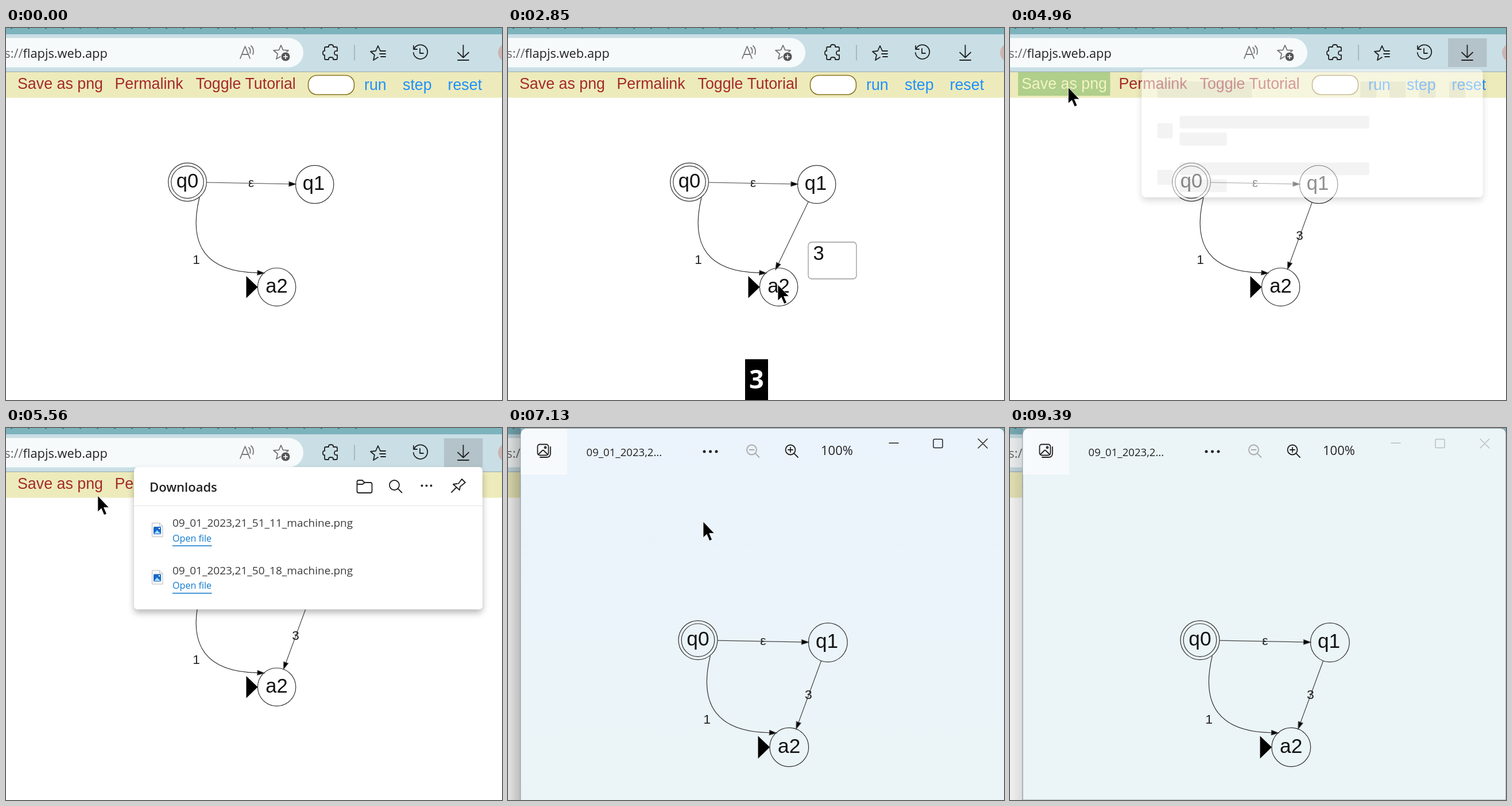
Animation of 864x648 px, one loop 9.46 s. Source, as an HTML page:

```html
<!DOCTYPE html>
<html lang="en">
<head>
<meta charset="utf-8">
<title>State machine editor</title>
<style>
html, body { margin: 0; width: 100%; height: 100%; overflow: hidden; background: #fff; }
svg { display: block; width: 864px; height: 648px; }
.ui { font-family: "Open Sans", "Noto Sans", sans-serif; }
.page { font-family: "Liberation Sans", Arial, sans-serif; }
.line { fill: none; stroke: #222; stroke-width: 1.8; stroke-linecap: round; stroke-linejoin: round; }
.node { fill: none; stroke: #333; stroke-width: 1.2; }
.name { font-size: 34.5px; text-anchor: middle; fill: #111; }
.label { font-size: 22.5px; text-anchor: middle; fill: #222; }
.edge { fill: #000; stroke: #444; stroke-width: 1.2; }
.menu { font-size: 26.8px; fill: #a52a2a; }
.act { font-size: 26.8px; fill: #1e90ff; }
.file { font-size: 19px; fill: #3b3b3b; }
.open { font-size: 16.1px; fill: #0f78cc; }
.key { font-size: 45px; font-weight: 700; fill: #fff; }
.bone rect { fill: #eaeaea; }
</style>
</head>
<body>
<svg viewBox="0 0 864 648">
  <defs>
    <linearGradient id="sky" x1="0" y1="0" x2="0" y2="1">
      <stop offset="0" stop-color="#ebf3fc"/><stop offset=".45" stop-color="#ebf4fa"/><stop offset="1" stop-color="#ebf4f6"/>
    </linearGradient>
    <linearGradient id="fade">
      <stop offset="0" stop-color="#000" stop-opacity=".1"/><stop offset="1" stop-color="#000"/>
    </linearGradient>
    <filter id="drop" x="-10%" y="-10%" width="120%" height="130%">
      <feDropShadow dx="0" dy="6" stdDeviation="6" flood-opacity=".28"/>
    </filter>
    <g id="graph" class="page">
      <path class="edge" id="toQ1"/>
      <path class="node" d="M337 295Q306 424 438 426.4"/>
      <path class="edge" id="toA2"/>
      <circle class="node" cx="316" cy="268.5" r="33.3"/>
      <circle class="node" cx="316" cy="268.5" r="28.2"/>
      <circle class="node" cx="537.7" cy="272.5" r="33.2"/>
      <circle class="node" cx="471.6" cy="451.2" r="33.2"/>
      <path d="M418.5 432V470.5L438.5 451.2Z"/>
      <text class="name" x="316" y="278">q0</text>
      <text class="name" x="536" y="282">q1</text>
      <text class="name" x="471.5" y="461">a2</text>
      <text class="label" x="427" y="276.5">ε</text>
      <text class="label" x="331.5" y="411">1</text>
    </g>
    <path id="star" d="M0-13 3.6-4.6 13-4 5.8 2 8 11 0 6.2-8 11-5.8 2-13-4-3.6-4.6Z"/>
    <path id="folder" d="M-13-8q0-3 3-3h6l4 4h10q3 0 3 3V8q0 3-3 3H-10q-3 0-3-3Z"/>
    <g id="lens"><circle r="8.5" cx="-2" cy="-2"/><path d="M4.2 4.2 11 11"/></g>
    <g id="doc">
      <path d="M254.500 165.500h13l5.500 5.500v18.500h-18.500Z" fill="#fafafa" stroke="#bbb"/>
      <path d="M267.500 165.500v5.500h5.500" fill="none" stroke="#bbb"/>
      <rect x="257" y="172" width="13" height="13" rx="1.500" fill="#1769c9"/>
      <path d="M258 184l5-6 6.500 6Z" fill="#a9dcff"/><circle cx="267" cy="175" r="1.300" fill="#fff"/>
    </g>
  </defs>

  <rect width="864" height="648" fill="#fff"/>
  <g class="ui">
    <rect width="864" height="77" fill="#c9dfe5"/>
    <rect width="864" height="11" fill="#7db3bd"/>
    <path d="M8 .5H620" stroke="#38616a" stroke-width="1.500" stroke-dasharray="3 27"/>
    <path d="M0 76.300H864" stroke="#a9babd" stroke-width="1.400"/>
    <rect x="-60" y="17.500" width="578" height="51" rx="25.500" fill="#f7fafb"/>
    <text x="29.500" y="51.500" font-size="21.800" fill="#666" text-anchor="end">s://</text>
    <text x="29.500" y="51.500" font-size="21.800" fill="#222">flapjs.web.app</text>
    <rect id="pressed" x="763" y="18" width="67.500" height="50" fill="#b3c3c9"/>
    <g class="line" style="stroke:#777">
      <path d="M408 53 416.500 32 425 53M411 46h11M423 34q4 4 2 10M427 31q6 6 3 15"/>
      <use href="#star" x="479" y="43"/>
    </g>
    <circle cx="487" cy="50" r="8" fill="#555" stroke="#f7fafb"/>
    <path d="M483 50h8M487 46v8" stroke="#fff" stroke-width="1.600"/>
    <g class="line">
      <path d="M557 33h5q-1-4 4-4t4 4h5q2 0 2 2v5q-5-1-5 3.500t5 3.500v6q0 2-2 2h-5q1-4-4-4t-4 4h-5q-2 0-2-2v-6q-3 1-3-3.500t3-3.500v-5q0-2 2-2Z"/>
      <path d="M607 30V56" style="stroke:#98a9ae;stroke-width:1.400"/>
      <path d="M660 40h-8l-4-9-4 9-9 1 7 6-2 9 8-5M652 40h9M651 45h10M653 50h8"/>
      <path d="M711 36A12.300 12.300 0 1 1 709.700 43M710 31v6h6M721 36v8h6"/>
      <path d="M796.500 30V51M787 42.500l9.500 9 9.500-9M787 56h19"/>
    </g>
    <circle cx="873" cy="43" r="16" fill="#cbb6b4"/>
  </g>

  <g class="page">
    <rect y="77" width="864" height="44.500" fill="#edebbb"/>
    <rect id="hover" x="14" y="77" width="160.500" height="41" fill="#afcf8a"/>
    <text id="save" class="menu" x="20" y="106">Save as png</text>
    <text class="menu" x="189.500" y="106">Permalink</text>
    <text class="menu" x="330.500" y="106">Toggle Tutorial</text>
    <rect x="526.500" y="82.500" width="80" height="33.500" rx="15" fill="#fff" stroke="#8a7420" stroke-width="1.600"/>
    <text class="act" x="624" y="108">run</text>
    <text class="act" x="691" y="108">step</text>
    <text class="act" x="769.500" y="108">reset</text>
    <use href="#graph"/>
    <path id="drag" class="edge"/>
    <text id="three" class="label" x="504.500" y="368.500">3</text>
    <g id="prompt">
      <rect x="523" y="373" width="84" height="64" rx="6" fill="#fff" stroke="#999" stroke-width="1.300"/>
      <text id="typed" class="name" x="541" y="404">3</text>
    </g>
  </g>

  <g id="panel" class="ui">
    <rect id="sheet" x="223" y="68" width="607" height="248" rx="7" fill="#fff" filter="url(#drop)"/>
    <g id="bones" class="bone"></g>
    <g id="list">
      <text x="250" y="110.500" font-size="22" font-weight="600" fill="#222">Downloads</text>
      <g class="line">
        <use href="#folder" x="624.500" y="102"/><path d="M612 98h9l4-3"/>
        <use href="#lens" x="678.500" y="101.500"/>
        <path d="M788 97 794 89 800 95 791 102 790 108 779 98 786 97M784 104 776 112"/>
      </g>
      <path d="M724.500 100.500h.01M732.500 100.500h.01M740.500 100.500h.01" stroke="#222" stroke-width="4" stroke-linecap="round"/>
      <path d="M223 135.500H830" stroke="#e4e4e4"/>
      <g id="row">
        <rect id="rowBox" x="231" y="138.500" width="591.500" height="79" fill="#f1f1f1" stroke-width="3"/>
        <g class="line">
          <path d="M669 186V168q0-3 3-3h5l4 4h8q3 0 3 3v3M669 186l4-9q1-2 3-2h18l-3 10q-1 3-3 3H671q-2 0-2-2Z"/>
          <path d="M751 167.500h24M758 167q0-5 5-5t5 5M754 168l2 19q0 2 2 2h10q2 0 2-2l2-19M760 174v9M766 174v9"/>
        </g>
      </g>
      <use href="#doc"/><use href="#doc" y="82.500"/>
      <text class="file" x="290" y="172">09_01_2023,21_51_11_machine.png</text>
      <text class="open" x="290" y="197.500">Open file</text>
      <text class="file" x="290" y="254.500">09_01_2023,21_50_18_machine.png</text>
      <text class="open" x="290" y="280">Open file</text>
      <path d="M290 205.300H358.500M290 287.800H358.500" stroke="#0f78cc" stroke-width="1.500"/>
    </g>
  </g>

  <g id="viewer" class="ui">
    <rect id="shade" x="-12" width="34" height="648" fill="url(#fade)"/>
    <path d="M22 648V12Q22 .5 33.500 .5H853Q864 .5 864 10V648Z" fill="#ebf4f7" stroke="#84969b" stroke-width="1.200"/>
    <path id="active" d="M22.500 648V12Q22.500 1 33.500 1H853Q864 1 864 10V648Z" fill="url(#sky)"/>
    <path d="M22.500 81V12Q22.500 1 33.500 1H103V81Z" fill="#f7fafc"/>
    <g class="line">
      <rect x="51.500" y="28.500" width="19" height="19" rx="4"/>
      <path d="M53 46l6.500-6.500q1.500-1.500 3 0L69 46M74 33v11q0 7-7 7H56"/>
      <circle cx="65" cy="34" r="1.500"/>
      <g style="stroke:#aaa"><use href="#lens" x="426.500" y="40"/><path d="M420.500 38h8"/></g>
      <use href="#lens" x="494" y="40"/><path d="M488 38h8M492 34v8"/>
      <path id="controls" style="stroke-width:1.500" d="M664 26.300h16M743 19.500h12q2 0 2 2v11q0 2-2 2h-12q-2 0-2-2v-11q0-2 2-2ZM819 19l16 16M835 19l-16 16"/>
    </g>
    <path d="M342 41h.01M352.500 41h.01M363 41h.01" stroke="#222" stroke-width="5" stroke-linecap="round"/>
    <text x="136.500" y="48.500" font-size="18.600" fill="#222">09_01_2023,2...</text>
    <text x="545" y="47" font-size="22" fill="#222">100%</text>
    <g id="photo" class="page" transform="translate(8.300 95.400) scale(1.021)">
      <use href="#graph"/>
      <path id="shot" class="edge"/>
      <text class="label" x="504.500" y="368.500">3</text>
    </g>
  </g>

  <g id="keys" class="ui">
    <rect id="keyBox" y="577" height="71"/>
    <text id="key1" class="key" y="628">3</text>
    <text id="key2" class="key" x="399" y="628">Enter</text>
  </g>
  <circle id="press" r="20" fill="#ff3c3c" fill-opacity=".62"/>
  <path id="arrow" d="M0 0V28L6.200 22.300 11 33.500 15.500 31.500 10.700 20.500H19.500Z" stroke="#fff" stroke-width=".8"/>
  <path id="hand" d="M0-.5q2.500-2 4.500 1V12l9 2q5 1 5 6l-2 8v6H1l-1-4-8-10q-1-3 2-3.500L0 20Z" fill="#fff" stroke="#111" stroke-width="1.500" stroke-linejoin="round"/>
</svg>
<script>
const LOOP = 9460;
const $ = id => document.getElementById(id);
const set = (id, attrs) => { for (const k in attrs) $(id).setAttribute(k, attrs[k]); };
const show = (id, on) => { $(id).style.display = on ? "" : "none"; };
const clamp = v => Math.max(0, Math.min(1, v));
const ramp = (t, a, b) => clamp((t - a) / (b - a));
const smooth = u => u * u * (3 - 2 * u);
const mix = (a, b, u) => a + (b - a) * u;

// Pointer stops: time, x, y. It eases between neighbours.
const stops = [
  [70, 509, 474], [890, 560, 267], [960, 560, 267], [1020, 552, 287],
  [1410, 480, 433], [1720, 470, 447], [3660, 470, 447], [4490, 101.5, 103.5],
  [5300, 101.5, 103.5], [6110, 340, 163], [7390, 340, 163], [8300, 629, 393],
  [8360, 629, 393], [8680, 735, 149], [8990, 792, 655]
];

function pointer(t) {
  let i = 0;
  while (i < stops.length - 2 && t >= stops[i + 1][0]) i++;
  const [a, b] = [stops[i], stops[i + 1]];
  const u = smooth(ramp(t, a[0], b[0]));
  return [mix(a[1], b[1], u), mix(a[2], b[2], u)];
}

function arrowPath(x1, y1, x2, y2) {
  const len = Math.hypot(x2 - x1, y2 - y1) || 1;
  const c = (x2 - x1) / len, s = (y2 - y1) / len;
  const bx = x2 - 12 * c, by = y2 - 12 * s;
  return `M${x1} ${y1}L${bx} ${by}M${x2} ${y2}L${bx - 4 * s} ${by + 4 * c}L${bx + 4 * s} ${by - 4 * c}Z`;
}

const q1 = [537.7, 272.5], radius = 33.2;
function fromQ1(x, y) {
  const dx = x - q1[0], dy = y - q1[1], len = Math.hypot(dx, dy);
  if (len < radius + 12) return "";
  return arrowPath(q1[0] + dx / len * radius, q1[1] + dy / len * radius, x, y);
}

const finalEdge = fromQ1(483.5, 420);
set("toQ1", { d: arrowPath(349.5, 269, 505, 272) });
set("toA2", { d: arrowPath(437, 426.2, 450, 427) });
set("shot", { d: finalEdge });

const bone = (x, y, w, h) => `<rect x="${x}" y="${y}" width="${w}" height="${h}" rx="3"/>`;
$("bones").innerHTML = bone(251, 90, 168, 29)
  + [612, 664, 717, 770].map(x => bone(x, 90, 29, 29)).join("")
  + [0, 83].map(d => bone(251, 164 + d, 27, 27) + bone(290.5, 151 + d, 337.5, 22.5) + bone(290.5, 181 + d, 84, 23)).join("");

function draw(t) {
  const [x, y] = pointer(t);
  const inPanel = t > 5160 && t < 6850 && x > 232;
  const visible = t >= 70 && t < 8990;
  const at = `translate(${x} ${y})`;

  show("arrow", visible && !inPanel);
  show("hand", inPanel);
  set("arrow", { transform: at });
  set("hand", { transform: `translate(${x + 1} ${y})` });
  show("press", (t >= 1020 && t < 1480) || (t >= 4690 && t < 4820) || (t >= 6390 && t < 6510));
  set("press", { transform: at });

  // The new edge keeps the grab offset until its label is entered.
  const held = pointer(Math.min(t, 1410));
  show("drag", t >= 1020);
  set("drag", { d: t < 3250 ? fromQ1(held[0] - 14, held[1] - 12) : finalEdge });
  show("three", t >= 3250);
  show("prompt", t >= 1780 && t < 3250);
  show("typed", t >= 2850);

  const entered = t >= 3120;
  show("keys", t >= 2850 && t < 4000);
  set("keyBox", { x: entered ? 336 : 413, width: entered ? 195.5 : 40 });
  set("key1", { x: entered ? 342.5 : 420 });
  show("key2", entered);

  const overSave = x > 14 && x < 174 && y > 77 && y < 118;
  show("hover", overSave);
  $("save").style.fill = overSave ? "#f4f3c4" : "";

  const fade = ramp(t, 4890, 5025), loaded = t >= 5160;
  const size = 0.955 + 0.045 * fade;
  show("pressed", t >= 4760);
  show("panel", fade > 0 && t < 7050);
  set("panel", { opacity: fade, transform: `translate(526.5 242) scale(${size}) translate(-526.5 -242)` });
  set("sheet", { height: loaded ? 248 : 228 });
  show("bones", !loaded);
  show("list", loaded);
  show("row", inPanel || t >= 6390);
  set("rowBox", { stroke: t >= 6450 ? "#898989" : "none" });

  const opening = ramp(t, 6850, 7060);
  const grow = mix(0.9, 1, 1 - (1 - opening) ** 2);
  const active = t < 9390;
  show("viewer", opening > 0);
  set("viewer", { opacity: opening, transform: `translate(443 324) scale(${grow}) translate(-443 -324)` });
  show("photo", t >= 6980);
  show("active", active);
  set("shade", { opacity: active ? 0.26 : 0.14 });
  $("controls").style.stroke = active ? "#222" : "#b9c0c3";
}

const start = performance.now();
function tick() {
  draw((performance.now() - start) % LOOP);
  requestAnimationFrame(tick);
}
tick();
</script>
</body>
</html>
```
